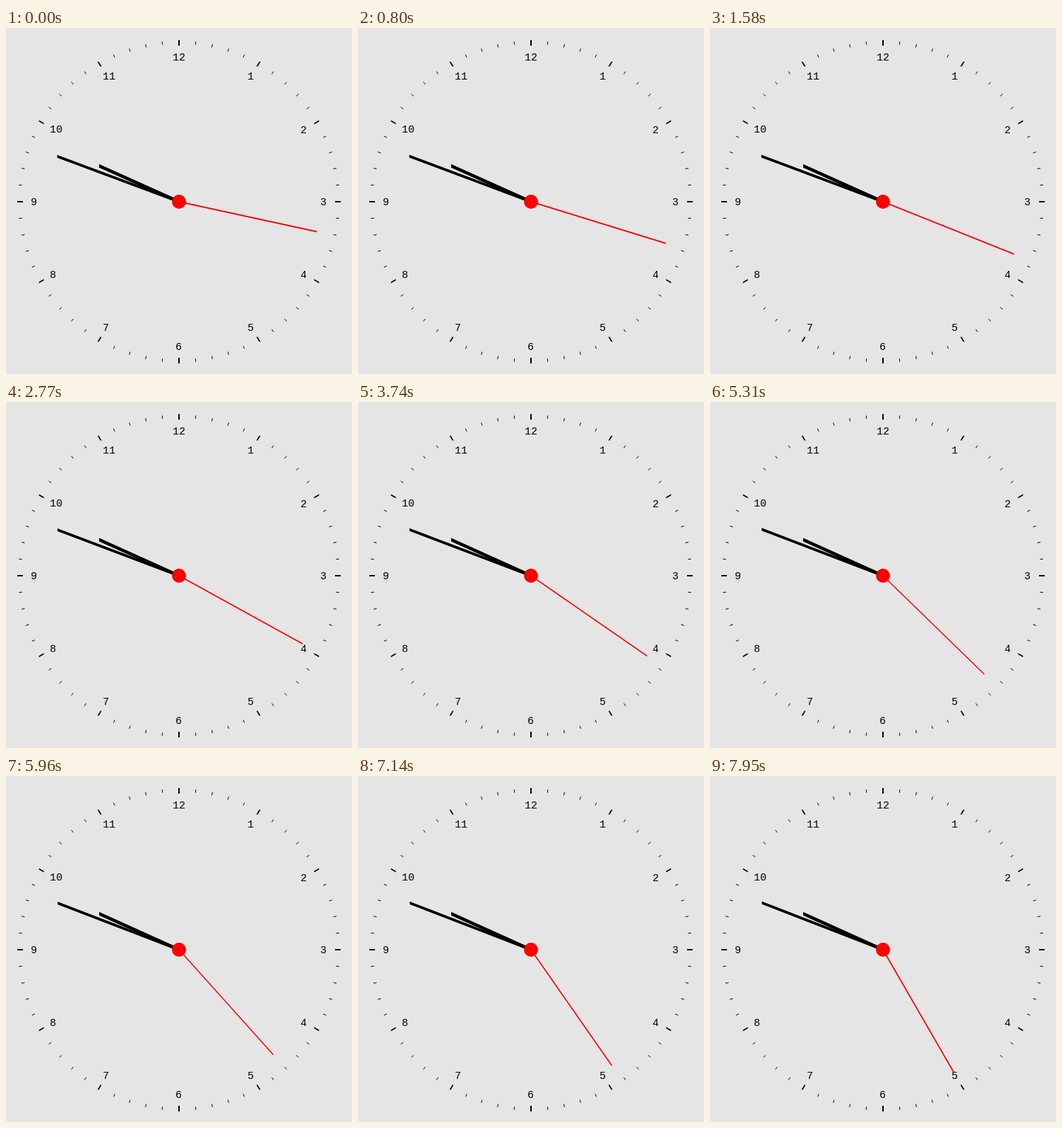
An HTML page with a canvas that plays this animation: 490 by 490 pixels, repeating every 7990 ms.

```html
<!DOCTYPE html>
<html lang="en">
<head>
<meta charset="utf-8">
<title>Analog clock</title>
<style>
  html, body { margin: 0; width: 100%; height: 100%; overflow: hidden; background: #e5e5e5; }
  canvas { display: block; }
</style>
</head>
<body>
<canvas id="clock" width="490" height="490"></canvas>
<script>
const ctx = document.getElementById('clock').getContext('2d');
const CX = 245, CY = 246;
const LOOP = 7990, STEPS = 197, STEP = LOOP / STEPS;

// Angles are in degrees, clockwise from 3 o'clock.
function polar(angle, radius) {
  const a = angle * Math.PI / 180;
  return [CX + radius * Math.cos(a), CY + radius * Math.sin(a)];
}

// Line whose ends are cut parallel to the nearer axis, like a pixel brush.
function bar(angle, from, to, thickness, color) {
  const [x1, y1] = polar(angle, from);
  const [x2, y2] = polar(angle, to);
  const flat = Math.abs(x2 - x1) > Math.abs(y2 - y1);
  const ox = flat ? 0 : thickness / 2;
  const oy = flat ? thickness / 2 : 0;
  ctx.fillStyle = color;
  ctx.beginPath();
  ctx.moveTo(x1 - ox, y1 - oy);
  ctx.lineTo(x2 - ox, y2 - oy);
  ctx.lineTo(x2 + ox, y2 + oy);
  ctx.lineTo(x1 + ox, y1 + oy);
  ctx.fill();
}

function drawDial() {
  ctx.fillStyle = '#e5e5e5';
  ctx.fillRect(0, 0, 490, 490);
  for (let i = 0; i < 60; i++) {
    if (i % 5) bar(i * 6, 223.5, 228, 1, '#000');
    else bar(i * 6, 221, 229, 2, '#000');
  }
  ctx.fillStyle = '#000';
  ctx.font = '15px "Liberation Mono", monospace';
  for (let n = 1; n <= 12; n++) {
    const [x, y] = polar(n * 30 - 90, 205);
    ctx.fillText(n, Math.round(x - (n === 12 ? 9 : 5.3)), Math.round(y + 5));
  }
}

function draw(ms) {
  const step = Math.min(STEPS - 1, Math.floor(ms / STEP + 0.3));
  const seconds = step * STEP / 1000;
  drawDial();
  bar(204.2 + seconds / 120, 0, 124, 5, '#000');
  bar(200.4 + seconds / 10, 0, 184, 4, '#000');
  bar(12.3 + seconds * 6, 0, 200, 2, '#f00');
  ctx.fillStyle = '#f00';
  ctx.beginPath();
  ctx.arc(CX, CY, 10, 0, 2 * Math.PI);
  ctx.fill();
}

const start = performance.now();
function frame() {
  draw((performance.now() - start) % LOOP);
  requestAnimationFrame(frame);
}
frame();
</script>
</body>
</html>
```
